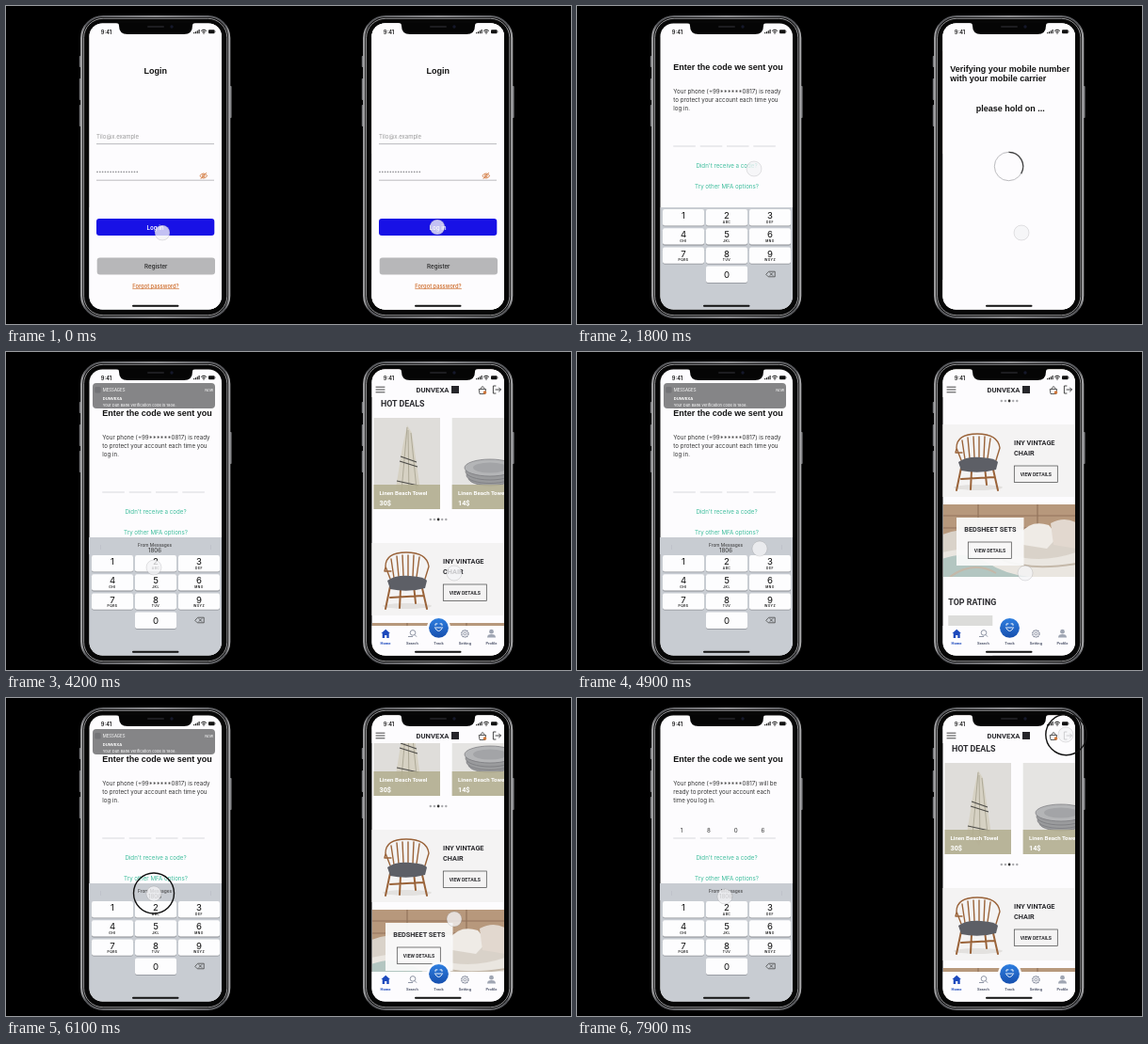
Animation of 600x338 px, one loop 8000 ms. Source, as an HTML page:

```html
<!DOCTYPE html>
<html lang="en">
<head>
<meta charset="utf-8">
<title>Login comparison</title>
<style>
html, body { margin: 0; width: 100%; height: 100%; overflow: hidden; background: #000; }
svg { display: block; width: 100vw; height: 100vh; }
text { font-family: Inter, sans-serif; font-size: 6.2px; fill: #333; dominant-baseline: central; }
.mid { text-anchor: middle; }
.head { font: bold 9px "Liberation Sans", Arial, sans-serif; fill: #111; }
.shop text { font-family: Roboto, sans-serif; font-weight: 700; font-size: 7.3px; fill: #2b2b2f; }
.shop .section { font-size: 8.9px; }
.shop .btn { font-size: 5.1px; text-anchor: middle; }
.shop .promo { fill: #9c5a2b; }
.shop .light { fill: #fff; }
.shop .item { font-size: 6.1px; fill: #fff; }
.shop .tab { font-size: 4.1px; text-anchor: middle; fill: #555b70; }
.box { fill: none; stroke: #444; stroke-width: .7; }
.link { fill: #3dbd9c; text-anchor: middle; }
.line { fill: none; stroke: #333; stroke-width: .9; stroke-linecap: round; stroke-linejoin: round; }
.wood { fill: none; stroke: #9a6339; stroke-width: 1.4; stroke-linecap: round; stroke-linejoin: round; }
.note text { fill: #fff; font-size: 4.1px; }
.digit { font-size: 9.6px; fill: #111; text-anchor: middle; }
.abc { font-size: 3.3px; font-weight: 600; letter-spacing: .5px; fill: #111; text-anchor: middle; }
.touch { fill: #f4f4f6; fill-opacity: .78; stroke: #000; stroke-opacity: .13; stroke-width: .8; }
.ring { fill: none; stroke: #111; stroke-width: 1.4; opacity: 0; }

.anim { animation: 8s linear infinite; }
.login-l { animation-name: loginL; }
.login-r { animation-name: loginR; }
.verify { animation-name: verify; }
.scroll { animation-name: scroll; }
.before { animation-name: before; }
.after { animation-name: after; }
.note { animation-name: note; }
.strip { animation-name: strip; }
.touch-l { animation-name: touchL; }
.touch-r { animation-name: touchR; }
.ring-l { animation-name: ringL; }
.ring-r { animation-name: ringR; }
.spin { transform-origin: 158.5px 170.5px; animation: spin .9s linear infinite; }

@keyframes loginL { 0%, 6.5% { opacity: 1; } 9%, 100% { opacity: 0; } }
@keyframes loginR { 0%, 10.5% { opacity: 1; } 13%, 100% { opacity: 0; } }
@keyframes verify { 0%, 27% { opacity: 1; } 30%, 100% { opacity: 0; } }
@keyframes before { 0%, 78% { opacity: 1; } 80%, 100% { opacity: 0; } }
@keyframes after { 0%, 78% { opacity: 0; } 80%, 100% { opacity: 1; } }
@keyframes note {
  0%, 47% { opacity: 0; transform: translateY(-30px); }
  49.5%, 77.5% { opacity: 1; transform: none; }
  80.5%, 100% { opacity: 0; transform: translateY(-30px); }
}
@keyframes strip { 0%, 48% { opacity: 0; } 49.5%, 100% { opacity: 1; } }
@keyframes scroll {
  0%, 37% { transform: none; animation-timing-function: ease-in-out; }
  50%, 53% { transform: translateY(-129px); animation-timing-function: ease-in-out; }
  61%, 69% { transform: translateY(-255px); animation-timing-function: ease-in-out; }
  76%, 77% { transform: translateY(-192px); animation-timing-function: ease-in-out; }
  85%, 100% { transform: translateY(-130px); }
}
@keyframes touchL {
  0% { transform: translate(166px, 241px); }
  3.75%, 8.75% { transform: translate(158px, 236px); }
  21.5%, 24.5% { transform: translate(188px, 173px); }
  33%, 36.5% { transform: translate(157px, 240px); }
  43%, 54% { transform: translate(157px, 229px); }
  60.5%, 62% { transform: translate(194px, 209px); }
  66%, 82% { transform: translate(157px, 208px); }
  90%, 100% { transform: translate(157px, 211px); }
}
@keyframes touchR {
  0%, 9% { transform: translate(158px, 235px); }
  20%, 24% { transform: translate(172px, 241px); }
  34%, 36.5% { transform: translate(167px, 240px); }
  43%, 80% { transform: translate(176px, 235px); }
  87%, 100% { transform: translate(219px, 39px); }
}
@keyframes ringL { 0%, 66% { opacity: 0; } 67%, 78% { opacity: 1; } 79.5%, 100% { opacity: 0; } }
@keyframes ringR { 0%, 87.5% { opacity: 0; } 88.5%, 100% { opacity: 1; } }
@keyframes spin { to { transform: rotate(360deg); } }
</style>
</head>
<body>
<svg viewBox="0 0 600 338" preserveAspectRatio="none">
<defs>
  <clipPath id="screen"><rect x="88.5" y="18.5" width="140.5" height="304" rx="14"/></clipPath>
  <clipPath id="bedClip"><rect x="89" y="417" width="140" height="77"/></clipPath>
  <linearGradient id="metal" x2="1" y2="0">
    <stop offset="0" stop-color="#a4a4a6"/><stop offset=".03" stop-color="#55565a"/>
    <stop offset=".5" stop-color="#8b8b8e"/><stop offset=".97" stop-color="#55565a"/><stop offset="1" stop-color="#a4a4a6"/>
  </linearGradient>
  <linearGradient id="blue" x2="0" y2="1"><stop stop-color="#2f7fe0"/><stop offset="1" stop-color="#164fae"/></linearGradient>

  <g id="shell">
    <g fill="#77787b">
      <rect x="77.8" y="53" width="2" height="12" rx=".8"/><rect x="77.8" y="77" width="2" height="23" rx=".8"/>
      <rect x="77.8" y="105" width="2" height="23" rx=".8"/><rect x="237.6" y="85" width="2" height="34" rx=".8"/>
    </g>
    <rect x="80.2" y="11" width="157" height="320" rx="23" fill="#070707" stroke="url(#metal)" stroke-width="2.2"/>
    <rect x="82.6" y="13.3" width="152.2" height="315.4" rx="20.5" fill="none" stroke="#b9b9bb" stroke-width=".8"/>
    <rect x="88.5" y="18.5" width="140.5" height="304" rx="14" fill="#fdfcfe"/>
  </g>

  <g id="top">
    <path d="M117 18h84q-3 0-3 3q0 9-9 9h-60q-9 0-9-9q0-3-3-3z" fill="#050505"/>
    <rect x="150" y="21" width="18" height="2" rx="1" fill="#1d1d20"/><circle cx="176" cy="22" r="1.7" fill="#15182a"/>
    <text x="106.5" y="27.3" class="mid" style="font-size:5.7px;font-weight:600;fill:#111">9:41</text>
    <path d="M199.7 29.3v-1.3m1.8 1.3v-2.1m1.8 2.1v-3.1m1.8 3.1v-4.2" stroke="#111" stroke-width="1.1"/>
    <path d="M207.2 26.4q2.8-2.6 5.6 0M208.4 27.8q1.6-1.5 3.2 0" stroke="#111" stroke-width="1" fill="none"/><circle cx="210" cy="29" r=".7"/>
    <rect x="215" y="25.2" width="6.6" height="4" rx="1" fill="#111"/><path d="M222.3 26.5v1.4" stroke="#777" stroke-width=".7"/>
  </g>
  <rect id="bar" x="134" y="317.8" width="49.5" height="2" rx="1" fill="#111"/>

  <g id="login">
    <rect x="88" y="18" width="142" height="305" fill="#fdfcfe"/>
    <text x="158.8" y="69" class="head mid">Login</text>
    <text x="96" y="138.4" style="font-size:6px;fill:#999">Tilo@x.example</text>
    <path d="M96 146.6h125M96 185.2h125" stroke="#b5b5b8" stroke-width=".9"/>
    <path d="M97 176.3h43" stroke="#929296" stroke-width="1.7" stroke-linecap="round" stroke-dasharray="0 2.82"/>
    <g fill="none" stroke="#d2783c" stroke-width=".9">
      <path d="M205.8 180.5q4-5 8 0q-4 5-8 0z"/><circle cx="209.8" cy="180.5" r="1.3"/><path d="M206.8 183.8l6-6.6"/>
    </g>
    <rect x="96" y="226" width="125.3" height="18" rx="3" fill="#1811e6"/>
    <text x="158.5" y="235.3" class="mid" style="font-weight:600;fill:#fff">Log in</text>
    <rect x="96.7" y="267.6" width="125.3" height="18" rx="3" fill="#b7b7b9"/>
    <text x="159.3" y="276.8" class="mid" style="font-weight:500;fill:#222">Register</text>
    <text x="159" y="297.3" class="mid" style="font-size:5.7px;font-weight:600;fill:#d2783c">Forgot password?</text>
    <path d="M134.3 300.6h49.6" stroke="#d2783c" stroke-width=".7"/>
  </g>
</defs>

<rect width="600" height="338" fill="#000"/>

<g>
  <use href="#shell"/>
  <g clip-path="url(#screen)">
    <text x="102.3" y="65.4" class="head">Enter the code we sent you</text>
    <g class="anim before">
      <text x="102.3" y="90.8">Your phone (+99******0817) is ready</text>
      <text x="102.3" y="99.8">to protect your account each time you</text>
      <text x="102.3" y="108.8">log in.</text>
    </g>
    <g class="anim after">
      <text x="102.3" y="90.8">Your phone (+99******0817) will be</text>
      <text x="102.3" y="99.8">ready to protect your account each</text>
      <text x="102.3" y="108.8">time you log in.</text>
      <g class="mid">
        <text x="111" y="140.8">1</text><text x="140" y="140.8">8</text>
        <text x="168.7" y="140.8">0</text><text x="197.5" y="140.8">6</text>
      </g>
    </g>
    <path d="M102.3 149h23.5M130.8 149h23.5M159 149h23.5M187.3 149h23.5" stroke="#d4d4d8" stroke-width=".9"/>
    <text x="159" y="169.6" class="link">Didn't receive a code?</text>
    <text x="159" y="191.8" class="link">Try other MFA options?</text>
    <rect x="88" y="214" width="142" height="110" fill="#c8ccd2"/>
    <g class="anim strip">
      <rect x="88" y="197" width="142" height="18" fill="#c8ccd2"/>
      <path d="M100.5 205v5M217.5 205v5" stroke="#b9bdc4" stroke-width=".6"/>
      <text x="158" y="204.5" class="mid" style="font-size:4.8px">From Messages</text>
      <text x="158" y="210.7" class="mid">1806</text>
    </g>
    <g id="keys"></g>
    <path d="M201 285l2.6-2.8h6.6v5.6h-6.6zM205 283.6l2.8 2.8m0-2.8l-2.8 2.8" class="line" style="stroke-width:.7"/>
    <g class="anim note">
      <rect x="92" y="33" width="130" height="27" rx="4" fill="#858587"/>
      <rect x="94.2" y="37" width="6.4" height="6.4" rx="1.5" fill="#747477"/>
      <text x="102.7" y="40.3" style="font-size:4.4px">MESSAGES</text>
      <text x="220" y="40.3" text-anchor="end">Now</text>
      <text x="102.7" y="49.3" style="font-weight:700">DUNVEXA</text>
      <text x="102.7" y="56.2">Your Dun Bank verification code is 1806.</text>
    </g>
    <use href="#login" class="anim login-l"/>
    <use href="#bar"/>
  </g>
  <use href="#top"/>
  <circle r="8" class="touch anim touch-l"/>
  <circle cx="157" cy="207.5" r="21.5" class="ring anim ring-l"/>
</g>

<g transform="translate(300)">
  <use href="#shell"/>
  <g clip-path="url(#screen)">
    <g class="shop">
      <g class="anim scroll">
        <rect x="88" y="48" width="142" height="109" fill="#d8c9c2"/>
        <path d="M95 124l20-8 28 5-22 9z" fill="#c6b5ad"/>
        <path d="M106 82l24-3 4 22-26 5z" fill="#b9b7b7"/>
        <path d="M103 104l28-5 4 10-28 6z" fill="#a3a2a4"/>
        <path d="M102 89l9-5 9 15-15 4z" fill="#f1eeeb"/>
        <path d="M96 96l10 4v25M96 96v23M106 100l34-6M139 94v25M96 110l10 5 33-6M101 98v14M112 115v7l27-8M105 83l2 14M131 80l3 16M133 97v13" class="wood" style="stroke:#b97a42;stroke-width:2"/>
        <text x="153.3" y="71" style="font-size:5px;font-weight:400">HOT DEALS THIS WEEK</text>
        <g class="promos">
          <text x="152.8" y="84" class="promo">SALE UP 50%</text><text x="152.8" y="95" class="promo">MODERN</text>
          <text x="152.8" y="105.7" class="promo">FURNITURE</text>
        </g>
        <rect x="153.3" y="119.3" width="46" height="17.5" class="box"/><text x="176.3" y="128.2" class="btn">VIEW NOW</text>
        <g fill="#fff">
          <circle cx="150.3" cy="150" r="1.2"/><circle cx="154.4" cy="150" r="1.2"/>
          <circle cx="158.6" cy="150" r="1.2" fill="#a79487"/><circle cx="162.5" cy="150" r="1.2"/><circle cx="166.4" cy="150" r="1.2"/>
        </g>

        <text x="98" y="184.2" class="section">HOT DEALS</text>
        <rect x="90.5" y="199" width="70.5" height="97" fill="#dfddda"/>
        <path d="M126 207l5 8 9 60-9 3-4 9-5-8-9 1 8-50z" fill="#d6d1c3"/>
        <path d="M126 209l-6 68m7-65l1 70m2-67l6 60" stroke="#aaa594" stroke-width=".9"/>
        <path d="M119 240l17 6M118 245l19 6M115 266l23 5" stroke="#4b4a47" stroke-width="1.1"/>
        <rect x="90.5" y="270" width="70.5" height="26" fill="#b3af91" fill-opacity=".88"/>
        <text x="96.5" y="278.3" class="item">Linen Beach Towel</text><text x="96.5" y="289.3" class="light">30$</text>
        <rect x="173.7" y="199" width="70" height="97" fill="#e5e4e2"/>
        <g fill="#9a9b9d" stroke="#77787c" stroke-width=".7">
          <ellipse cx="214" cy="263" rx="23" ry="8"/><ellipse cx="214" cy="260" rx="25" ry="8.5"/>
          <ellipse cx="214" cy="256" rx="26" ry="9"/><ellipse cx="214" cy="252" rx="27" ry="9" fill="#b4b5b7"/>
        </g>
        <ellipse cx="214" cy="252" rx="18" ry="5.5" fill="#a3a4a7"/>
        <rect x="173.7" y="270" width="70" height="26" fill="#b3af91" fill-opacity=".88"/>
        <text x="180" y="278.3" class="item">Linen Beach Towel</text><text x="180" y="289.3" class="light">14$</text>
        <g fill="#a9a9ad">
          <circle cx="150.8" cy="307" r="1.2"/><circle cx="154.9" cy="307" r="1.2"/>
          <circle cx="159.1" cy="307" r="1.4" fill="#333"/><circle cx="163.2" cy="307" r="1.2"/><circle cx="167.3" cy="307" r="1.2"/>
        </g>

        <rect x="88" y="332" width="142" height="77" fill="#f4f3f3"/>
        <ellipse cx="126" cy="399" rx="26" ry="3" fill="#e3e1df"/>
        <path d="M103 357q0-15 22-15t24 15M103 357l5 13M149 357l-4 13M109 349l3 20M115 346l2 22M121 345l1 22M127 345v22M133 345l-1 23M139 347l-3 21M103 358l-1 4h7" class="wood"/>
        <path d="M108 378l-5 24M119 381l-1 20M142 380l5 22M133 377l2 19M108 390l35-2" class="wood" style="stroke-width:2"/>
        <path d="M105 372q8-6 24-5t18 5l-2 8q-18 5-37 1z" fill="#5d5f66"/>
        <text x="164" y="351.2">INY VINTAGE</text><text x="164" y="362.3">CHAIR</text>
        <rect x="164.3" y="376" width="46" height="17.5" class="box"/><text x="187.3" y="385" class="btn">VIEW DETAILS</text>

        <g clip-path="url(#bedClip)">
          <rect x="88" y="417" width="142" height="77" fill="#b7987c"/>
          <path d="M88 429h142M88 442h142M126 417v25M189 417v28" stroke="#93745c" stroke-width="1.2"/>
          <path d="M88 449q30-10 70-6t72 0v52H88z" fill="#d9d2c9"/>
          <path d="M172 447q10-14 29-8l10 12-12 13-25-4z" fill="#efebe6"/>
          <path d="M203 437q15-8 28 0v27l-25-4z" fill="#e2d8cf"/>
          <path d="M88 468q35-9 70 2t72-2v28H88z" fill="#eae6e0"/>
          <path d="M88 475q26-10 46 3t46 16H88z" fill="#b3c6c1"/>
          <path d="M96 494q25-18 49-4M152 476q30 12 78 4" fill="none" stroke="#c4b8a9" stroke-width="2"/>
        </g>
        <rect x="103" y="431" width="71.5" height="51" fill="#fafafa" fill-opacity=".94"/>
        <text x="138.8" y="443" class="mid">BEDSHEET SETS</text>
        <rect x="115.3" y="457" width="46" height="17.5" class="box"/><text x="138.5" y="465.8" class="btn">VIEW DETAILS</text>
        <text x="94.3" y="521" class="section">TOP RATING</text>
        <rect x="94.3" y="535" width="47" height="60" fill="#dcdcda"/>
      </g>

      <rect x="88" y="18" width="142" height="30" fill="#fdfcfe"/>
      <path d="M93 37.2h9M93 40h9M93 42.8h9" class="line"/>
      <text x="153" y="40" class="mid" style="font-size:7.7px">DUNVEXA</text>
      <rect x="173" y="36" width="8" height="8" fill="#26262a"/>
      <path d="M202.6 39.5h7l-.8 5h-5.4zM204 39q2-5 4.2 0" class="line" style="stroke-width:.8"/><circle cx="208.5" cy="43" r="1.8" fill="#d2783c"/>
      <path d="M220 36h-2.6v8h2.6M220 40h5.3m-1.8-2l2 2-2 2" class="line"/>

      <rect x="88" y="291" width="142" height="33" fill="#fdfcfe"/>
      <circle cx="159.5" cy="293" r="12.5" fill="#fdfcfe"/>
      <circle cx="159.5" cy="293.3" r="10.4" fill="url(#blue)"/>
      <path d="M156 290.5v-1.6h2m3 0h2v1.6M155.3 293h8.4M156.2 294.2q3.3 5 6.6 0" class="line" style="stroke:#fff"/>
      <path d="M98.5 299l4.7-4.3 4.7 4.3h-1.2v5h-2.4v-3h-2.2v3h-2.4v-5z" fill="#1c49bd"/>
      <g fill="none" stroke="#747b8e" stroke-width=".8">
        <circle cx="132" cy="298.4" r="2.8"/><path d="M134 300.5l2 2.2M127 302.5h5"/>
        <circle cx="187.4" cy="299.4" r="1.5"/><circle cx="187.4" cy="299.4" r="3.6" stroke-dasharray="1.7 .55" stroke-width="1.2"/>
      </g>
      <g fill="#a0a6b3"><circle cx="215.5" cy="297.2" r="2.4"/><path d="M211 303.5q0-3.4 4.5-3.4t4.5 3.4z"/></g>
      <text x="103" y="309" class="tab" style="fill:#1c49bd">Home</text><text x="131.3" y="309" class="tab">Search</text>
      <text x="159.5" y="309" class="tab">Track</text><text x="187.4" y="309" class="tab">Setting</text><text x="215.5" y="309" class="tab">Profile</text>
    </g>

    <g class="anim verify">
      <rect x="88" y="18" width="142" height="305" fill="#fdfcfe"/>
      <text x="96.3" y="66.8" class="head">Verifying your mobile number</text>
      <text x="96.3" y="77" class="head">with your mobile carrier</text>
      <text x="160.3" y="108.8" class="head mid">please hold on ...</text>
      <g class="spin" fill="none">
        <circle cx="158.5" cy="170.5" r="15.2" stroke="#a9a9ac" stroke-width=".8"/>
        <path d="M158.5 155.3a15.2 15.2 0 0 1 13.2 22.8" stroke="#333" stroke-width="1.2"/>
      </g>
    </g>
    <use href="#login" class="anim login-r"/>
    <use href="#bar"/>
  </g>
  <use href="#top"/>
  <circle r="8" class="touch anim touch-r"/>
  <circle cx="219.5" cy="39" r="21.7" class="ring anim ring-r"/>
</g>
</svg>
<script>
const letters = ["", "ABC", "DEF", "GHI", "JKL", "MNO", "PQRS", "TUV", "WXYZ"];

function key(col, row, digit, label) {
  const x = 91 + col * 46, y = 216 + row * 20.2, mid = x + 22;
  const digitY = label === null ? y + 8.8 : y + 6.6;
  return `<rect x="${x}" y="${y + .8}" width="44" height="17.4" rx="2" fill="#8d9096"/>
    <rect x="${x}" y="${y}" width="44" height="17.4" rx="2" fill="#fdfdfe"/>
    <text x="${mid}" y="${digitY}" class="digit">${digit}</text>
    <text x="${mid}" y="${y + 13.9}" class="abc">${label || ""}</text>`;
}

document.getElementById("keys").innerHTML =
  letters.map((label, i) => key(i % 3, Math.floor(i / 3), i + 1, label)).join("") + key(1, 3, 0, null);
</script>
</body>
</html>
```
